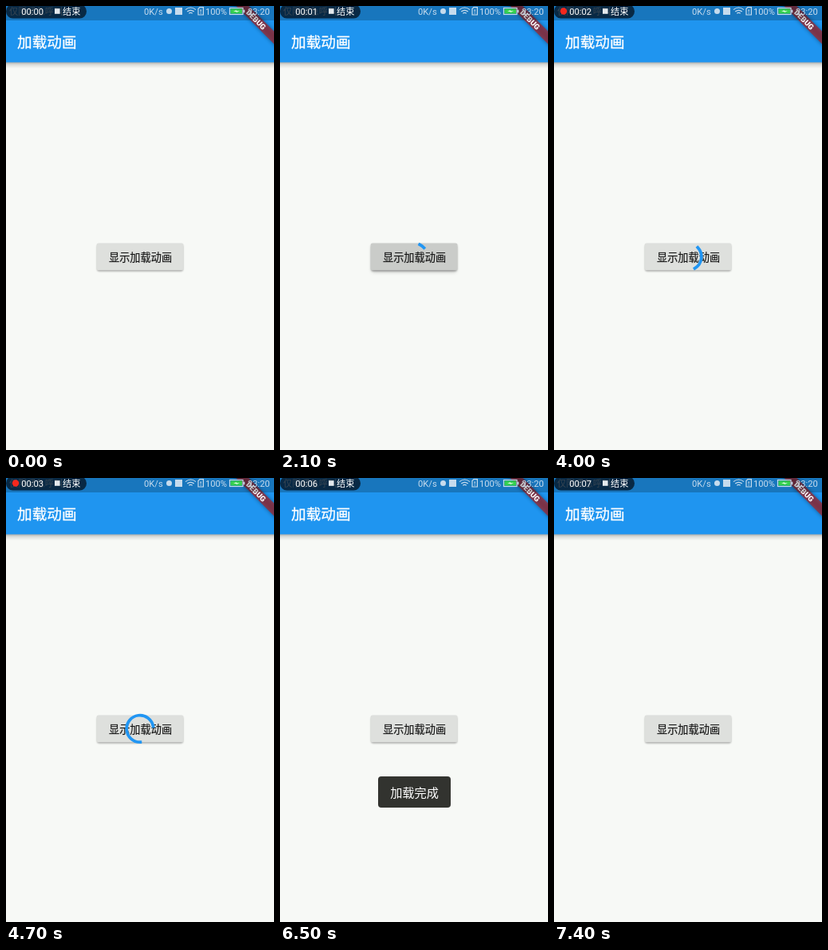
Recreate the animation shown at these times as an HTML page. Size 336 by 555 pixels, loop 7.6 s.

```html
<!DOCTYPE html>
<html lang="zh-CN">
<head>
<meta charset="utf-8">
<title>加载动画</title>
<style>
  html, body { margin: 0; width: 100%; height: 100%; overflow: hidden; background: #f7f9f6; }
  svg { display: block; width: 336px; height: 555px; }
  text { font-family: Roboto, "Noto Sans CJK SC", "Noto Sans CJK", sans-serif; }
  .medium { font-weight: 500; stroke-width: .3; }
  .status { font-size: 11.2px; fill: #c6dbed; }
  .pill { font-size: 11.2px; fill: #fff; }
</style>
</head>
<body>
<svg viewBox="0 0 336 555">
  <defs>
    <linearGradient id="barShadow" x2="0" y2="1">
      <stop offset="0" stop-color="#000" stop-opacity=".32"/>
      <stop offset=".4" stop-color="#000" stop-opacity=".12"/>
      <stop offset="1" stop-color="#000" stop-opacity="0"/>
    </linearGradient>
    <filter id="soft" x="-20%" y="-50%" width="140%" height="200%"><feGaussianBlur stdDeviation="1.3"/></filter>
    <filter id="softer" x="-20%" y="-50%" width="140%" height="200%"><feGaussianBlur stdDeviation="2.6"/></filter>
  </defs>

  <rect width="336" height="555" fill="#f7f9f6"/>

  <!-- app bar -->
  <rect y="70" width="336" height="8" fill="url(#barShadow)"/>
  <rect width="336" height="70.4" fill="#1f95f0"/>
  <text class="medium" x="14" y="51.6" font-size="18.67" fill="#fff" stroke="#fff">加载动画</text>

  <!-- debug ribbon -->
  <g transform="translate(336 -5.3) rotate(45)">
    <rect x="-44" y="26.1" width="88" height="11.2" opacity=".4" filter="url(#softer)"/>
    <rect x="-44" y="26.1" width="88" height="11.2" fill="#b71c1c" fill-opacity=".63"/>
    <text y="35.1" font-size="9.5" font-weight="900" fill="#fff" text-anchor="middle">DEBUG</text>
  </g>

  <!-- status bar -->
  <rect width="336" height="18" opacity=".21"/>
  <g class="status">
    <text x="4" y="10.5">仅限紧急呼叫</text>
    <text x="173" y="10.5">0K/s</text>
    <text x="250" y="10.5">100%</text>
    <text x="303" y="10.5">23:20</text>
    <circle cx="204.5" cy="6.5" r="3.5"/>
    <rect x="212" y="2" width="9" height="9"/>
    <g fill="none" stroke="#c6dbed" stroke-width="1.2">
      <path d="M225 4.6Q231.5 -.6 238 4.6M227.2 7Q231.5 3.6 235.8 7M229.3 9.2Q231.5 7.6 233.7 9.2"/>
      <path d="M243 1.6H247.4V11H241V3.6Z"/>
      <path d="M244.2 4.2V7.3M244.2 8.3V9.5"/>
      <rect x="280.5" y="2.5" width="16.5" height="8"/>
    </g>
    <rect x="281.5" y="3.5" width="14.5" height="6" fill="#35d04f"/>
    <rect x="297.5" y="4.7" width="1.8" height="3.6"/>
    <path d="M285 6.7L289 5.2V6.2L293 6.3L288.7 8V7Z" fill="#eafff0"/>
  </g>

  <!-- recorder pill -->
  <rect x="0" y="-2" width="101" height="17.5" rx="8.7" fill="#04101c" opacity=".74"/>
  <circle id="dot" cx="12" cy="6.5" r="4.2" fill="#f5281e"/>
  <text id="clock" class="pill" x="19.2" y="10.5"></text>
  <rect x="61" y="3.2" width="6.6" height="6.6" fill="#e4e9ed"/>
  <text class="pill" x="71" y="10.5">结束</text>

  <!-- button -->
  <rect id="lift" x="115" y="299.5" width="106" height="33" rx="2" filter="url(#softer)"/>
  <rect x="114.3" y="298.2" width="107.6" height="33.2" rx="2" opacity=".36" filter="url(#soft)"/>
  <rect x="113.8" y="296.6" width="108.6" height="33.6" rx="1.9" fill="#dee0dd"/>
  <rect id="press" x="113.8" y="296.6" width="108.6" height="33.6" rx="1.9"/>
  <text class="medium" x="129" y="319.2" font-size="13.2" fill="#141414" stroke="#141414" stroke-opacity=".5">显示加载动画</text>

  <path id="spinner" fill="none" stroke="#2196f3" stroke-width="3.73" stroke-linecap="square"/>

  <g id="toast">
    <rect x="123" y="373" width="91" height="39" rx="4" fill="#32332f"/>
    <text x="168.5" y="399.2" font-size="15.2" fill="#fff" text-anchor="middle">加载完成</text>
  </g>
</svg>
<script>
const LOOP = 7600, STEP = 100;
const SPIN = { from: 2000, x: 168, y: 313.4, r: 16.8 };
const SECONDS = [0, 1500, 2800, 4100, 4900, 5600, 6500, 7300];
const DOT_ON = [1100, 2200, 3500, 4600, 5300, 6100, 6800, 7600];

// [time, value] pairs, linear in between
const PRESS = [[1800, 0], [2000, 1], [2100, 1], [2500, 0]];
const SPIN_TURNS = [[1950, 0], [3200, 0.692], [5000, 1.728]];
const SPIN_ALPHA = [[4800, 1], [5000, 0]];
const TOAST_ALPHA = [[4900, 0], [5300, 1], [6500, 1], [6900, 0.54], [7400, 0]];

const el = id => document.getElementById(id);
const clamp = v => Math.min(1, Math.max(0, v));

function track(points, t) {
  if (t <= points[0][0]) return points[0][1];
  for (let i = 1; i < points.length; i++) {
    const [t0, a] = points[i - 1], [t1, b] = points[i];
    if (t < t1) return a + (b - a) * (t - t0) / (t1 - t0);
  }
  return points[points.length - 1][1];
}

// cubic-bezier(.4, 0, .2, 1)
function ease(x) {
  let lo = 0, hi = 1;
  for (let i = 0; i < 20; i++) {
    const u = (lo + hi) / 2, v = 1 - u;
    if (1.2 * u * v * v + 0.6 * u * u * v + u * u * u < x) lo = u; else hi = u;
  }
  return lo * lo * (3 - 2 * lo);
}

function arc(startDeg, sweepDeg) {
  const point = deg => {
    const a = deg * Math.PI / 180;
    return `${SPIN.x + SPIN.r * Math.sin(a)} ${SPIN.y - SPIN.r * Math.cos(a)}`;
  };
  return `M${point(startDeg)}A${SPIN.r} ${SPIN.r} 0 ${sweepDeg > 180 ? 1 : 0} 1 ${point(startDeg + sweepDeg)}`;
}

function drawSpinner(t) {
  const alpha = t < SPIN.from ? 0 : track(SPIN_ALPHA, t);
  el("spinner").setAttribute("opacity", alpha);
  if (!alpha) return;
  const phase = track(SPIN_TURNS, t) % 1;
  const head = 270 * ease(clamp(phase * 2));
  const tail = 270 * ease(clamp(phase * 2 - 1));
  el("spinner").setAttribute("d", arc(306 * phase + tail, Math.max(head - tail, 0.1)));
}

function draw(t) {
  const second = SECONDS.filter(s => s <= t).length - 1;
  el("clock").textContent = "00:0" + second;
  el("dot").setAttribute("opacity", clamp((t - DOT_ON[second] + STEP) / (2 * STEP)));

  const press = track(PRESS, t);
  el("press").setAttribute("opacity", 0.09 * press);
  el("lift").setAttribute("opacity", 0.18 * press);

  drawSpinner(t);
  el("toast").setAttribute("opacity", track(TOAST_ALPHA, t));
}

const began = performance.now();
function tick() {
  const t = (performance.now() - began) % LOOP;
  draw(Math.floor(t / STEP) * STEP);
  requestAnimationFrame(tick);
}
tick();
</script>
</body>
</html>
```
